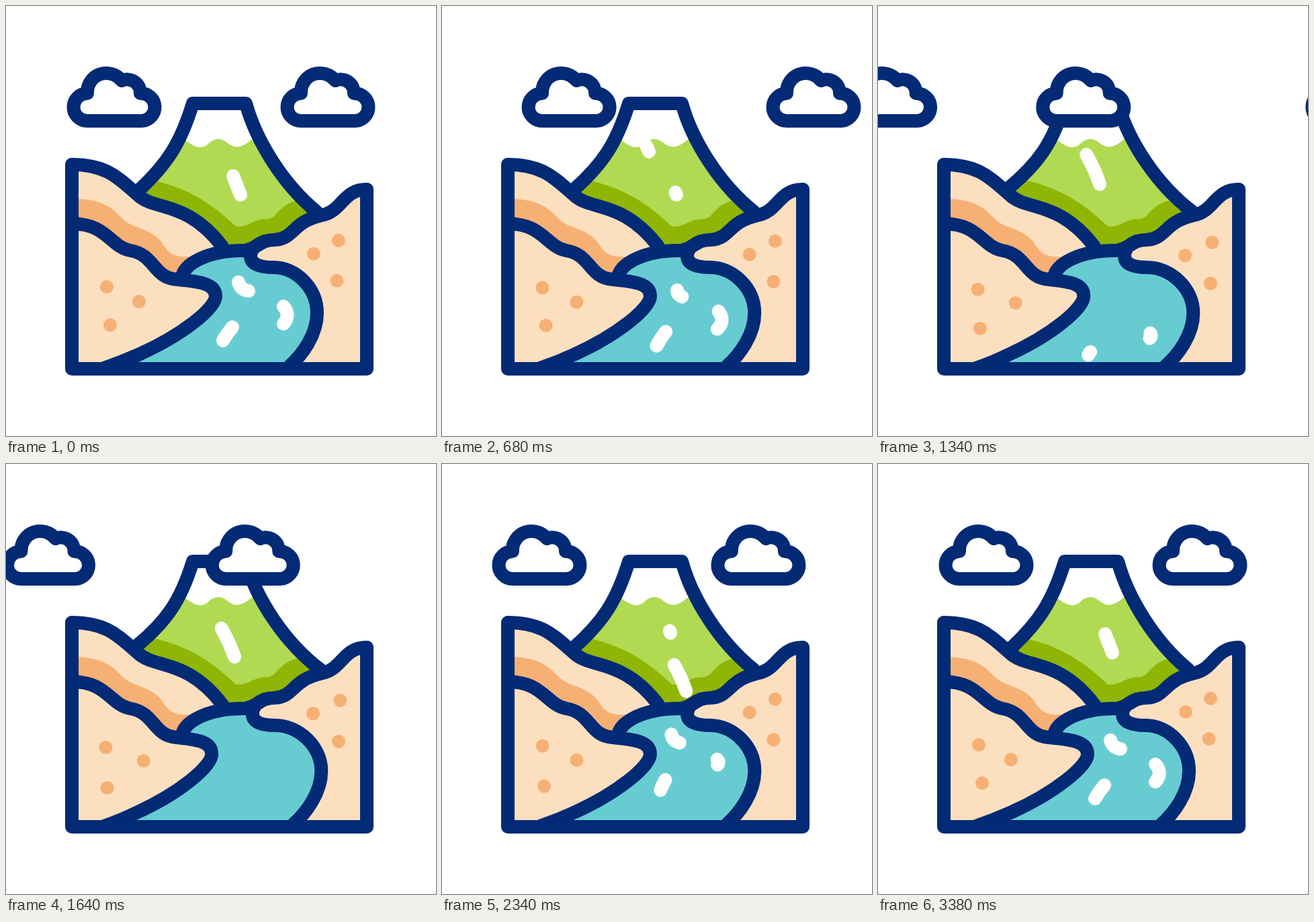
An HTML page with a canvas for the animation above (3.5 s loop, 640 by 640 pixels).

```html
<!DOCTYPE html>
<html lang="en">
<head>
<meta charset="utf-8">
<title>Mountain river</title>
<style>
  html, body { margin: 0; width: 100%; height: 100%; overflow: hidden; background: #fff; }
  canvas { display: block; width: 100vmin; height: 100vmin; }
</style>
</head>
<body>
<canvas id="stage" width="640" height="640"></canvas>
<script>
const LOOP = 3500, SETTLED = 2900;
const NAVY = '#032a75', SAND = '#fcdfbf', ORANGE = '#f6b074',
      LIME = '#b0da52', GREEN = '#8fb505', WATER = '#67ccd2', WHITE = '#fff';
const ctx = document.getElementById('stage').getContext('2d');
ctx.lineWidth = 20;
ctx.lineCap = ctx.lineJoin = 'round';

const progress = (t, start, end) => Math.min(1, Math.max(0, (t - start) / (end - start)));
function ease(t, start, end) {
  const s = progress(t, start, end);
  return s * s * (3 - 2 * s);
}
const swell = (t, start, peak, end) => ease(t, start, peak) - ease(t, peak, end);
const mix = (a, b, s) => a.map((v, i) => v + (b[i] - v) * s);

function fill(path, color) {
  ctx.fillStyle = color;
  ctx.fill(new Path2D(path));
}
function stroke(path, color = NAVY) {
  ctx.strokeStyle = color;
  ctx.stroke(new Path2D(path));
}
function dot(x, y) {
  ctx.fillStyle = ORANGE;
  ctx.beginPath();
  ctx.arc(x, y, 10, 0, 7);
  ctx.fill();
}
function streak([x1, y1], [x2, y2], bend) {
  const cx = (x1 + x2) / 2 + bend * (y2 - y1);
  const cy = (y1 + y2) / 2 - bend * (x2 - x1);
  stroke(`M${x1} ${y1}Q${cx} ${cy} ${x2} ${y2 + 0.01}`, WHITE);
}

// A glint grows from `born` to tail-head, rests, then shrinks into `gone`.
const slopeGlint = { born: [339, 248], tail: [338, 253], head: [349, 281], gone: [349, 281],
                     start: 2300, end: 720, bend: 0 };
const riverGlints = [
  { born: [337, 394], tail: [346, 411], head: [361, 424], gone: [355, 438],
    start: 1800, end: 940, bend: -0.33 },
  { born: [409, 438], tail: [413, 447], head: [413, 473], gone: [403, 498],
    start: 2220, end: 1480, bend: 0.44 },
  { born: [329, 464], tail: [337, 478], head: [323, 498], gone: [312, 522],
    start: 1910, end: 1440, bend: -0.06 }
];
function drawGlint({ born, tail, head, gone, start, end, bend }, t) {
  if (t < end) {
    const s = t / end;
    streak(mix(tail, gone, s ** 2.5), mix(head, gone, s ** 1.5), bend);
  } else if (t >= start) {
    const s = progress(t, start, SETTLED);
    streak(mix(born, tail, s), mix(born, head, Math.sin(s * Math.PI / 2)), bend);
  }
}
function drawRunningGlint(t) {
  const top = [304, 208], foot = [366, 344];
  const head = progress(t, 560, 2420), tail = progress(t, 1170, 2920);
  if (head > 0 && tail < 1) streak(mix(top, foot, tail), mix(top, foot, head), 0.05);
}

const CLOUD = 'M121 171A20.5 20.5 0 0 1 121 130A28.5 28.5 0 0 1 172 111' +
              'A20 20 0 0 1 200 130A20.5 20.5 0 0 1 202 171Z';
function drawCloud(dx) {
  ctx.save();
  ctx.translate(dx, 0);
  fill(CLOUD, WHITE);
  stroke(CLOUD);
  ctx.restore();
}

const RIDGE = 'M98 236C150 236 167 256 196 281C222 306 268 288 322 358';
const RIVER_TOP = 'M262 404C264 384 300 364 352 364';

function draw(t) {
  const w = swell(t, 150, 1500, 2900);
  const late = swell(t, 450, 2000, 2750);
  ctx.fillStyle = WHITE;
  ctx.fillRect(0, 0, 640, 640);

  const slopes = `M${198 - 4 * w} ${274 - 3 * w}C${240 - 2 * w} 235 260 204 278 145` +
                 `H357C372 200 ${412 + 2 * w} 265 ${462 + 6 * w} 306`;
  const mountain = slopes + 'L420 350L340 370L196 281Z';
  ctx.save();
  ctx.clip(new Path2D(mountain));
  fill('M180 195H262Q288 220 302 204Q316 192 330 204Q345 217 364 200L372 195H480V380H180Z', LIME);
  fill('M190 254C260 264 300 288 342 328C355 330 365 322 375 319C385 315 392 321 402 310' +
       'C410 300 420 292 436 289H480V380H190Z', GREEN);
  ctx.restore();
  drawRunningGlint(t);
  drawGlint(slopeGlint, t);
  stroke(slopes);

  fill(RIDGE + 'L262 404H98Z', SAND);
  fill('M98 287C140 287 155 297 175 318C190 332 215 330 232 352' +
       'C245 374 255 374 285 373L262 404H98Z', ORANGE);

  fill(RIVER_TOP + 'L480 400V540H150Z', WATER);
  riverGlints.forEach(g => drawGlint(g, t));

  const tip = 364 + 3 * w, bow = 463 + 6.5 * w;
  const right = `M537 273C500 273 502 306 468 312C425 322 430 346 400 348` +
                `C375 349 ${tip} 362 ${tip} 372C${tip} 385 ${380 + 2 * w} 389 ${398 + 2 * w} 389` +
                `C${432 + 4 * w} 389 ${bow} 420 ${bow} 457C${bow} 490 ${440 + 6 * w} 520 ${422 + 6 * w} 536`;
  const point = 312 - 6 * w;
  const left = `M98 324C150 324 155 358 185 364C222 370 218 404 254 407` +
               `C${285 - 3 * w} 410 ${point} 412 ${point} 432` +
               `C${point} 450 ${262 - 4 * w} 490 ${197 - 3 * w} 519Q172 530 146 539`;
  fill(right + 'L537 540Z', SAND);
  fill(left + 'L98 540Z', SAND);
  stroke(RIDGE);
  stroke(RIVER_TOP + 'C362 364 372 358 385 350');
  stroke(right);
  stroke(left);
  stroke('M98 236V540H537V273');

  dot(150 - 1.5 * w, 418 + 4 * w);
  dot(198 + 7 * w, 440 + 2 * w);
  dot(155 - 5 * late, 475 + 8 * late);
  dot(495 + 2.5 * w, 349 + 3 * w);
  dot(458 - w, 369 + 2.5 * w);
  dot(492.5 + 2.5 * w, 409 + 4 * w);

  drawCloud(-272 + 272 * ease(t, 40, 2740));
  drawCloud(318 * ease(t, 260, 2560));
  drawCloud(318 + 293 * ease(t, 90, 1890));
}

function tick() {
  draw(performance.now() % LOOP);
  requestAnimationFrame(tick);
}
tick();
</script>
</body>
</html>
```
